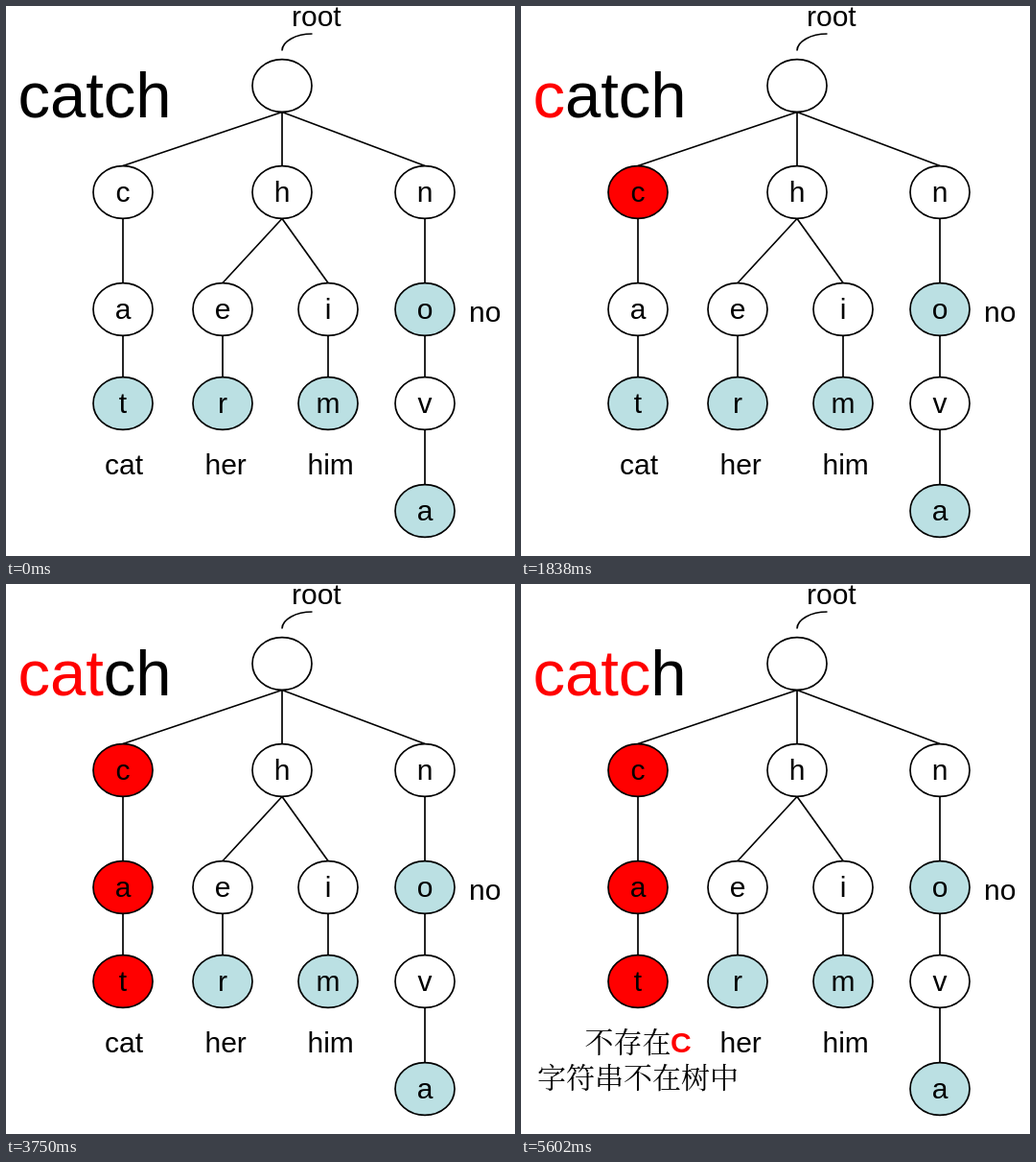
An HTML page with a canvas that plays this animation: 531 by 573 pixels, repeating every 6.15 s.

```html
<!DOCTYPE html>
<html lang="en">
<head>
<meta charset="utf-8">
<title>Trie lookup</title>
<style>
  html, body { margin: 0; width: 100%; height: 100%; overflow: hidden; background: #fff; }
  canvas { display: block; width: 531px; height: 573px; }
</style>
</head>
<body>
<canvas id="stage" width="531" height="573"></canvas>
<script>
const ctx = document.getElementById('stage').getContext('2d');
const LOOP = 6150;
const STEPS = [1010, 2390, 3750, 4780];
const RED = '#ff0000', TEAL = '#bbe0e3', INK = '#000', PAPER = '#fff';
const SANS = '"Liberation Sans", Arial, sans-serif';
const HAN = '"Noto Serif CJK SC", "Noto Sans CJK SC", "Noto Sans CJK", serif';

// letter, x, y, ends a word, step at which it is matched
const NODES = [
  ['', 288, 83],
  ['c', 122, 194, false, 1], ['h', 288, 194], ['n', 437, 194],
  ['a', 122, 316, false, 2], ['e', 226, 316], ['i', 336, 316], ['o', 437, 316, true],
  ['t', 122, 414, true, 3], ['r', 226, 414, true], ['m', 336, 414, true],
  ['v', 437, 414], ['a', 437, 526, true]
];
const EDGES = [[0, 1], [0, 2], [0, 3], [1, 4], [2, 5], [2, 6], [3, 7],
               [4, 8], [5, 9], [6, 10], [7, 11], [11, 12]];
const LABELS = [['root', 298, 21], ['no', 483, 329], ['her', 207.5, 488], ['him', 314.5, 488]];

function text(str, x, y, font, color = INK) {
  ctx.font = font;
  ctx.fillStyle = color;
  ctx.fillText(str, x, y);
  return x + ctx.measureText(str).width;
}

function drawEdges() {
  ctx.beginPath();
  for (const [from, to] of EDGES) {
    const [, x1, y1] = NODES[from], [, x2, y2] = NODES[to];
    ctx.moveTo(x1, y1 + 27.5);
    ctx.lineTo(x2, y2 - 27.5);
  }
  ctx.moveTo(288, 46.5);
  ctx.bezierCurveTo(288, 37, 302, 29, 319.5, 29);
  ctx.stroke();
}

function drawNode([letter, x, y, ends, match], step) {
  ctx.beginPath();
  ctx.ellipse(x, y, 31, 27.3, 0, 0, Math.PI * 2);
  ctx.fillStyle = match <= step ? RED : ends ? TEAL : PAPER;
  ctx.fill();
  ctx.stroke();
  ctx.textAlign = 'center';
  text(letter, x, y + 10, '30px ' + SANS);
  ctx.textAlign = 'left';
}

function drawWord(step) {
  const font = '67px ' + SANS;
  const x = text('catch'.slice(0, step), 12.4, 116, font, RED);
  text('catch'.slice(step), x, 116, font);
}

function drawResult(step) {
  if (step < 4) {
    text('cat', 103, 488, '30px ' + SANS);
    return;
  }
  const font = '500 30px ' + HAN;
  text('不存在', 66.5, 488, font);
  text('C', 156, 488, 'bold 30px ' + SANS, RED);
  text('字符串不在树中', 17, 524.5, font);
}

function draw(now) {
  const t = now % LOOP;
  const step = STEPS.filter(s => t >= s).length;
  ctx.fillStyle = PAPER;
  ctx.fillRect(0, 0, 531, 573);
  ctx.strokeStyle = INK;
  ctx.lineWidth = 1.7;
  drawEdges();
  for (const node of NODES) drawNode(node, step);
  for (const [str, x, y] of LABELS) text(str, x, y, '30px ' + SANS);
  drawWord(step);
  drawResult(step);
}

const start = performance.now();
function tick() {
  draw(performance.now() - start);
  requestAnimationFrame(tick);
}
tick();
</script>
</body>
</html>
```
